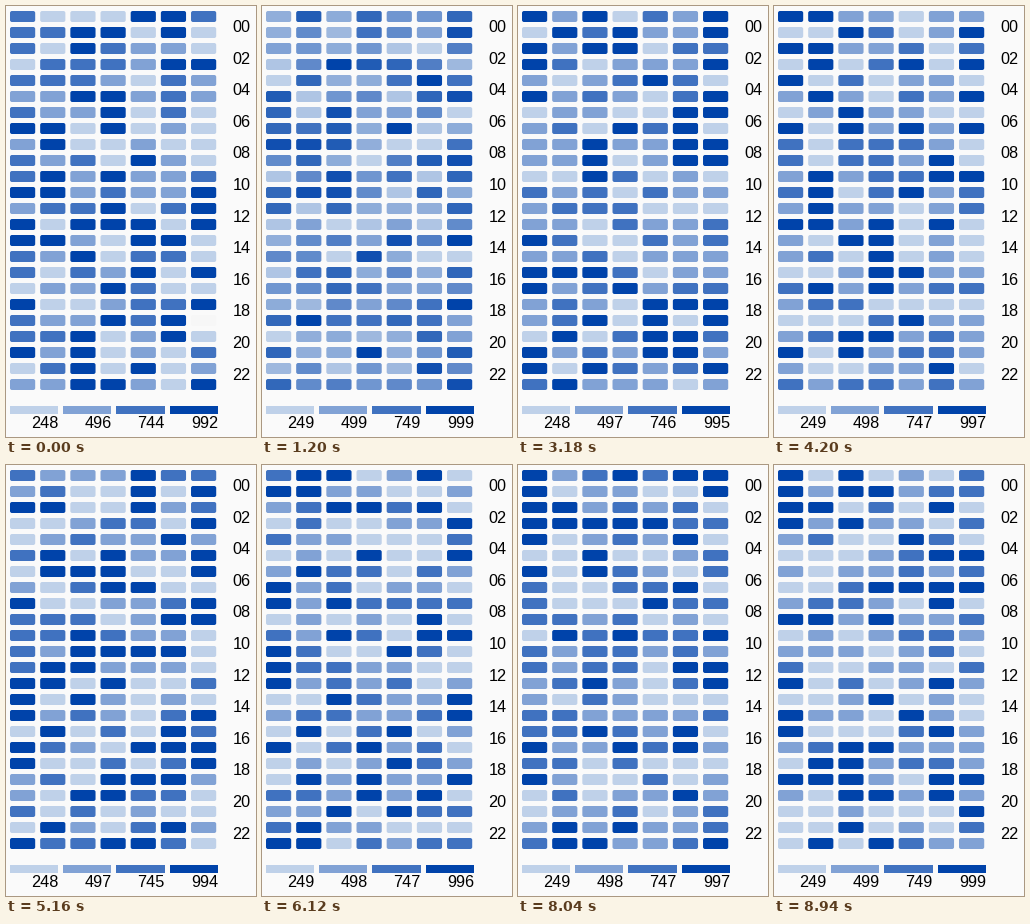
Write a matplotlib script that moves like this. It is 250x431 px and loops after 9.24 s.

```python
import matplotlib.pyplot as plt
import numpy as np
from matplotlib.animation import FuncAnimation
from matplotlib.collections import PatchCollection
from matplotlib.colors import to_rgb
from matplotlib.patches import FancyBboxPatch, Rectangle

W, H, DPI = 250, 431, 64
STEP, LOOP = 60, 9240
ROWS, COLS = 24, 7
FADE_STEPS = 3
FONT = dict(family="Liberation Sans", size=16.3 * 72 / DPI, color="black",
            ha="right", va="baseline")

BACK = "#fafafa"
EMPTY = "#f7f7f7"
SHADES = ["#bfd1e9", "#81a2d5", "#4072c0", "#0043aa"]
PALETTE = np.array([to_rgb(c) for c in SHADES])

# Times at which new data arrives, and the largest count in each data set
CHANGES = [240, 1200, 2100, 3060, 4080, 5040, 6000, 6960, 7920, 8820]
PEAKS = [992, 998, 999, 998, 995, 997, 994, 996, 1000, 997, 999]


def make_colors(seed):
    """Hourly counts for a week, sorted into four shades."""
    share = np.random.default_rng(seed).random(ROWS * COLS) ** 1.1
    return PALETTE[(share * 4).astype(int)]


def ease(u):
    return u * u * (3 - 2 * u)


COLORS = [make_colors(k) for k in range(len(PEAKS))]
COLORS[0][19 * COLS + 6] = to_rgb(EMPTY)  # one hour without data

fig = plt.figure(figsize=(W / DPI, H / DPI), dpi=DPI, facecolor=BACK)
ax = fig.add_axes([0, 0, 1, 1])
ax.set_xlim(0, W)
ax.set_ylim(H, 0)
ax.axis("off")

boxes = [
    FancyBboxPatch((4 + 30.17 * c, 5 + 16 * r), 25.2, 11,
                   boxstyle="round,pad=0,rounding_size=2")
    for r in range(ROWS) for c in range(COLS)
]
cells = PatchCollection(boxes, linewidths=0, edgecolors="none")
ax.add_collection(cells, autolim=False)

for i in range(ROWS // 2):
    ax.text(244.6, 26 + 31.6 * i, f"{2 * i:02d}", **FONT)

legend = []
for i, shade in enumerate(SHADES):
    x = 4 + 53.2 * i
    ax.add_patch(Rectangle((x, 400), 48.2, 7.5, fc=shade, lw=0))
    legend.append(ax.text(x + 48.4, 422, "", **FONT))


def draw(frame):
    t = frame * STEP
    k = sum(t >= c for c in CHANGES)
    colors = COLORS[k]
    if k:
        done = (t - CHANGES[k - 1]) // STEP + 1
        mix = ease(min(done / FADE_STEPS, 1))
        colors = (1 - mix) * COLORS[k - 1] + mix * colors
    cells.set_facecolor(colors)
    for i, label in enumerate(legend):
        label.set_text(str(PEAKS[k] * (i + 1) // 4))
    return [cells, *legend]


anim = FuncAnimation(fig, draw, frames=LOOP // STEP, interval=STEP,
                     init_func=lambda: draw(0), repeat=True, repeat_delay=0)
plt.show()
```
